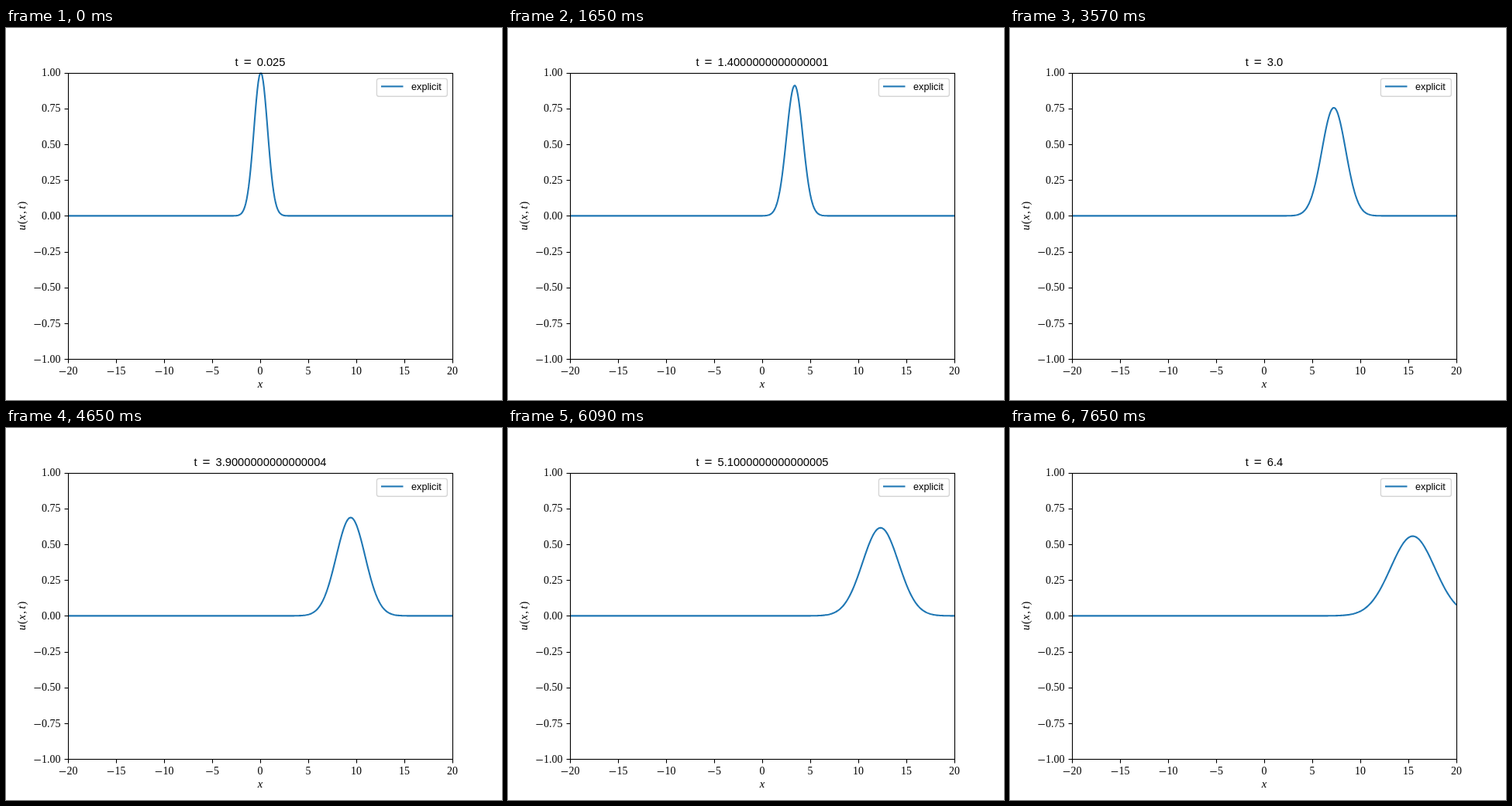
An HTML page with a canvas for the animation above (7.68 s loop, 640 by 480 pixels).

```html
<!DOCTYPE html>
<html lang="en">
<head>
<meta charset="utf-8">
<title>Wave packet</title>
<style>
  html, body { margin: 0; width: 100%; height: 100%; overflow: hidden; background: #fff; }
  canvas { display: block; }
</style>
</head>
<body>
<canvas id="plot" width="640" height="480"></canvas>
<script>
const ctx = document.getElementById('plot').getContext('2d');
const SERIF = '"Liberation Serif", serif', SANS = '"Liberation Sans", sans-serif';
const BLUE = '#1f77b4';
const STEP_MS = 30, STEPS = 256, DT = 0.025;
const SPEED = 2.415, SPREAD = 0.48;

const px = x => 328 + 12.4 * x;
const py = u => 242.4 - 184.8 * u;

function text(s, x, y, font, align = 'left') {
  ctx.font = font;
  ctx.textAlign = align;
  ctx.fillStyle = '#000';
  ctx.fillText(s, x, y);
}

function line(x1, y1, x2, y2, width = 1.11, color = '#000') {
  ctx.beginPath();
  ctx.moveTo(x1, y1);
  ctx.lineTo(x2, y2);
  ctx.lineWidth = width;
  ctx.strokeStyle = color;
  ctx.stroke();
}

// Tick label ending at `right`, with a wide mathematical minus
function number(value, digits, right, y) {
  const s = Math.abs(value).toFixed(digits);
  text(s, right, y, '13.9px ' + SERIF, 'right');
  if (value < 0) {
    const start = right - ctx.measureText(s).width;
    line(start - 9.7, y - 3.5, start - 1.2, y - 3.5, 0.9);
  }
}

function title(t) {
  const value = Number.isInteger(t) ? t.toFixed(1) : String(t);
  const small = '14.7px ' + SANS, parts = [['t', small, 7], ['=', '17px ' + SANS, 7], [value, small, 0]];
  const widths = parts.map(([s, font, gap]) => {
    ctx.font = font;
    return ctx.measureText(s).width + gap;
  });
  let x = 328 - widths.reduce((a, b) => a + b) / 2;
  parts.forEach(([s, font], i) => {
    text(s, x, 49, font);
    x += widths[i];
  });
}

function axes() {
  ctx.lineWidth = 1.11;
  ctx.strokeStyle = '#000';
  ctx.strokeRect(80.5, 58.5, 496, 369);
  for (let x = -20; x <= 20; x += 5) {
    const p = px(x);
    line(p + 0.5, 428, p + 0.5, 432.5);
    const half = (Math.abs(x) > 9 ? 6.95 : 3.5) + (x < 0 ? 5.4 : 0);
    number(x, 0, p + half, 447);
  }
  for (let u = -1; u <= 1; u += 0.25) {
    const p = Math.round(py(u)) + 0.5;
    line(75.5, p, 80, p);
    number(u, 2, 70.4, Math.round(py(u) + 4.5));
  }
  const roman = '14px ' + SERIF, italic = 'italic 14.5px ' + SERIF;
  text('x', 328, 464, italic, 'center');
  ctx.save();
  ctx.translate(25, 261);
  ctx.rotate(-Math.PI / 2);
  for (const [s, x, font] of [['u', 0, italic], ['(', 8, roman], ['x', 13.4, italic],
    [',', 21.3, roman], ['t', 27.5, italic], [')', 32.6, roman]]) text(s, x, 0, font);
  ctx.restore();
}

function curve(t) {
  const spread = 1 + (SPREAD * t) ** 2;
  ctx.save();
  ctx.beginPath();
  ctx.rect(80, 57.6, 496, 369.6);
  ctx.clip();
  ctx.beginPath();
  for (let x = -20; x <= 20.05; x += 0.1)
    ctx.lineTo(px(x), py(spread ** -0.25 * Math.exp(-((x - SPEED * t) ** 2) / spread)));
  ctx.lineWidth = 2.08;
  ctx.lineJoin = 'round';
  ctx.strokeStyle = BLUE;
  ctx.stroke();
  ctx.restore();
}

function legend() {
  ctx.beginPath();
  ctx.roundRect(478.4, 65.4, 91, 22.8, 2.8);
  ctx.fillStyle = 'rgba(255,255,255,0.8)';
  ctx.fill();
  ctx.lineWidth = 1.39;
  ctx.strokeStyle = 'rgba(204,204,204,0.8)';
  ctx.stroke();
  line(484, 75.4, 512.5, 75.4, 2.08, BLUE);
  text('explicit', 523, 80, '12.7px ' + SANS);
}

const begin = performance.now();
function draw() {
  const step = Math.floor((performance.now() - begin) / STEP_MS) % STEPS;
  const t = (step + 1) * DT;
  ctx.fillStyle = '#fff';
  ctx.fillRect(0, 0, 640, 480);
  curve(t);
  axes();
  title(t);
  legend();
  requestAnimationFrame(draw);
}
draw();
</script>
</body>
</html>
```
